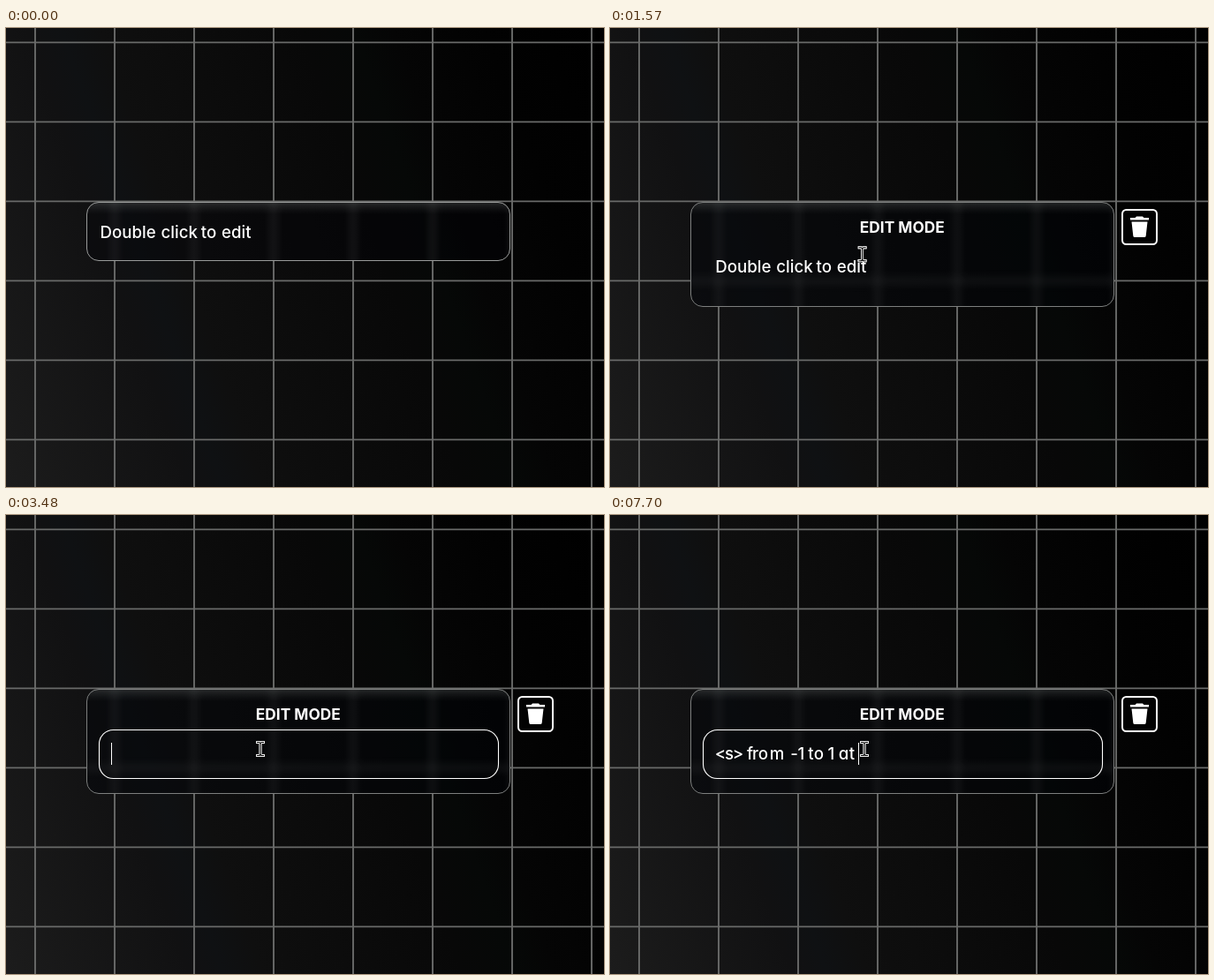
An HTML page for the animation above (8 s loop, 677x520 px).

```html
<!DOCTYPE html>
<html lang="en">
<head>
<meta charset="utf-8">
<title>Edit box</title>
<style>
  html, body { margin: 0; width: 100%; height: 100%; overflow: hidden; background: #000; }
  svg { display: block; }
  text { fill: #fff; font: 500 18.7px Inter, "Open Sans", sans-serif; font-feature-settings: "cv11"; white-space: pre; }
  .title { font-size: 17.3px; font-weight: 700; text-anchor: middle; }
  #typed text { text-anchor: middle; }
</style>
</head>
<body>
<svg width="677" height="520" viewBox="0 0 677 520">
  <defs>
    <linearGradient id="dusk" gradientUnits="userSpaceOnUse" x1="-164" y1="58" x2="602" y2="-214">
      <stop offset="0" stop-color="#1c1c1c"/>
      <stop offset=".24" stop-color="#111112"/>
      <stop offset=".286" stop-color="#0f1113"/>
      <stop offset=".337" stop-color="#0f0f0f"/>
      <stop offset=".6" stop-color="#080808"/>
      <stop offset=".67" stop-color="#060807"/>
      <stop offset=".72" stop-color="#050505"/>
      <stop offset=".84" stop-color="#020202"/>
      <stop offset="1" stop-color="#000"/>
    </linearGradient>
    <linearGradient id="sheen" x1="0" y1="0" x2="0" y2="1">
      <stop offset="0" stop-color="#dfe8e0" stop-opacity=".11"/>
      <stop offset="1" stop-color="#dfe8e0" stop-opacity="0"/>
    </linearGradient>
    <filter id="blur" filterUnits="userSpaceOnUse" x="0" y="0" width="677" height="520" color-interpolation-filters="sRGB">
      <feGaussianBlur stdDeviation="5"/>
    </filter>
    <clipPath id="cardClip"><rect id="clipBox" x="91" y="197" width="480" height="67" rx="14"/></clipPath>
  </defs>

  <rect width="677" height="520" fill="url(#dusk)"/>
  <path id="grid" stroke="#696a69" stroke-width="1.9" fill="none"/>

  <g clip-path="url(#cardClip)">
    <rect width="677" height="520" fill="url(#dusk)"/>
    <use href="#grid" filter="url(#blur)"/>
    <rect id="tint" width="677" height="520" fill="#020308"/>
    <rect x="91" y="197" width="480" height="14" fill="url(#sheen)"/>
  </g>
  <rect id="card" x="91.5" y="197.5" width="479" height="66" rx="13.5" fill="none"/>

  <g id="editor">
    <text class="title" x="302.5" y="232">EDIT</text>
    <text class="title" x="352.5" y="232">MODE</text>
    <rect id="field" x="105.5" y="243.5" width="452" height="55" rx="16" fill="none" stroke="#fff" stroke-width="1.1"/>
    <rect x="580" y="206" width="39" height="39" rx="4.5" fill="#020202" stroke="#fff" stroke-width="2"/>
    <path fill="#fff" d="M589 215H594.5L596 213.5H603L604.5 215H610V217.5H589Z M590.5 219.5H608.5L606.7 235.5Q606.5 237 605 237H594Q592.5 237 592.3 235.5Z"/>
  </g>

  <rect id="mark" y="258" height="26" fill="#0538a6"/>
  <g id="label">
    <text x="106.5" y="238">Double</text>
    <text x="175.5" y="238">click</text>
    <text x="220.8" y="238">to</text>
    <text x="244" y="238">edit</text>
  </g>
  <g id="typed"></g>
  <rect id="caret" y="258" width="1" height="25" fill="#fff"/>

  <path id="arrow" d="M.5 .5V13.5L3.6 10.7L5.9 16.2L8.2 15.2L5.9 9.9H10Z" fill="#0a0a0a" stroke="#fff" stroke-width="1"/>
  <g id="beam" fill="none" stroke-linecap="square">
    <path id="beamPath" d="M-3.5 -7.5H-2Q0 -7.5 0 -5.5Q0 -7.5 2 -7.5H3.5M0 -5.5V5.5M-3.5 7.5H-2Q0 7.5 0 5.5Q0 7.5 2 7.5H3.5" stroke="#f2f2f2" stroke-width="2.8"/>
    <use href="#beamPath"/>
    <path d="M-3.5 -7.5H-2Q0 -7.5 0 -5.5Q0 -7.5 2 -7.5H3.5M0 -5.5V5.5M-3.5 7.5H-2Q0 7.5 0 5.5Q0 7.5 2 7.5H3.5" stroke="#080808" stroke-width="1.1"/>
  </g>
  <circle id="press" r="12" fill="#ff0" fill-opacity=".5"/>
</svg>
<script>
const LOOP = 8000;
const EDIT = 1180, FOCUS = 1780, WORD = 2190, ALL = 2330, CLEAR = 3480;
const presses = [[890, 960], [1110, 1180], [1780, 1850], [2050, 2120], [2190, 2260], [2330, 2400]];
const line = "<s> from -1 to 1 at ";
const keyTimes = [3810, 4080, 4350, 4620, 4690, 5020, 5150, 5350, 5550, 5690, 5820, 5940,
  6160, 6290, 6410, 6610, 7160, 7300, 7500, 7700];
const stops = [119, 130, 139, 150, 155, 161, 167, 179, 198, 203, 213, 219, 224,
  230, 242, 247, 253, 258, 270, 277, 281];

const $ = id => document.getElementById(id);
const set = (el, attrs) => { for (const k in attrs) el.setAttribute(k, attrs[k]); };
const show = (el, on) => el.setAttribute("visibility", on ? "visible" : "hidden");
const clamp = v => Math.min(1, Math.max(0, v));
const easeOut = v => 1 - (1 - v) ** 2;
const mix = (a, b, p) => a + (b - a) * p;

let d = "";
for (let x = 33; x < 677; x += 90) d += `M${x} 0V520`;
for (let y = 16.4; y < 520; y += 90) d += `M0 ${y}H677`;
$("grid").setAttribute("d", d);

const glyphs = [...line].map((ch, i) => {
  const el = document.createElementNS("http://www.w3.org/2000/svg", "text");
  set(el, { x: (stops[i] + stops[i + 1]) / 2 + 0.5, y: 277 });
  el.textContent = ch;
  $("typed").append(el);
  return el;
});

function pointer(t) {
  if (t < 1300) {
    const p = easeOut(clamp((t - 200) / 530));
    return [mix(386, 276.5, p), mix(437, 222.5, p)];
  }
  const p = easeOut(clamp((t - 1320) / 460));
  return [mix(276.5, 288, p), mix(222.5, 265, p)];
}

function draw(t) {
  const edit = t >= EDIT;
  $("clipBox").setAttribute("height", edit ? 119 : 67);
  set($("card"), { height: edit ? 118 : 66, stroke: edit ? "#7d7f7e" : "#999b9a" });
  $("tint").setAttribute("opacity", edit ? 0.42 : 0.32);
  show($("editor"), edit);
  show($("field"), t >= FOCUS);

  show($("label"), t < CLEAR);
  $("label").setAttribute("transform", edit ? "translate(12.7 39)" : "translate(0 0)");
  const left = t < ALL ? 257 : 119;
  set($("mark"), { x: left, width: 291 - left });
  show($("mark"), t >= WORD && t < CLEAR);

  const count = keyTimes.filter(k => t >= k).length;
  glyphs.forEach((g, i) => show(g, i < count));
  $("caret").setAttribute("x", stops[count]);
  show($("caret"), t >= CLEAR);

  const [x, y] = pointer(t);
  const overField = edit && y > 243;
  const at = `translate(${x.toFixed(2)} ${y.toFixed(2)})`;
  for (const id of ["arrow", "beam", "press"]) $(id).setAttribute("transform", at);
  show($("arrow"), t >= 200 && !overField);
  show($("beam"), overField);
  show($("press"), presses.some(([a, b]) => t >= a && t < b));
}

function tick() {
  draw(performance.now() % LOOP);
  requestAnimationFrame(tick);
}
tick();
</script>
</body>
</html>
```
